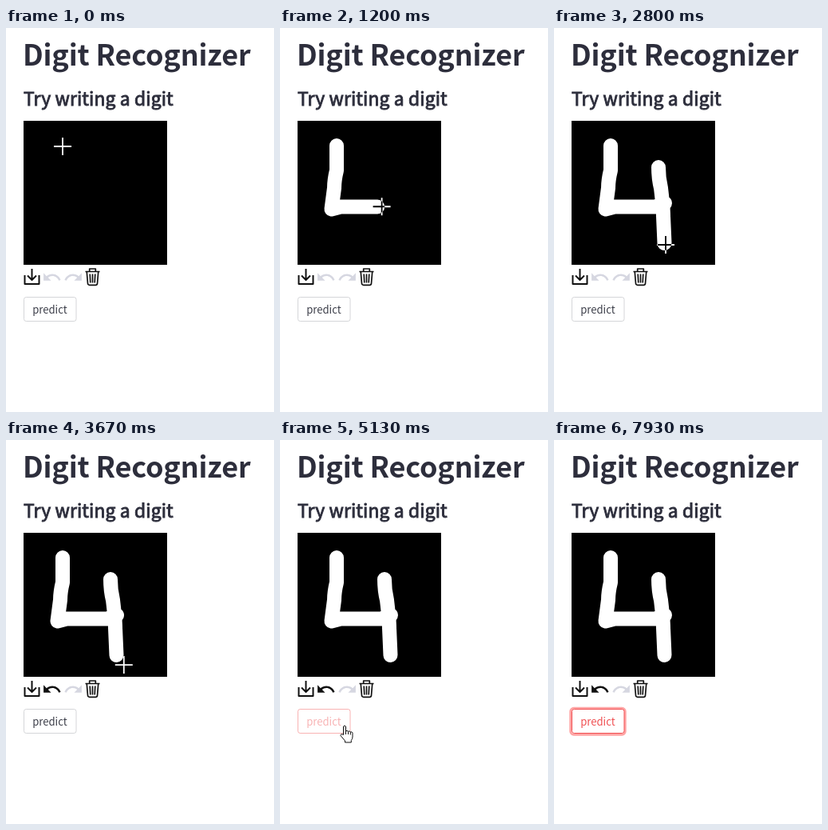
Animation, 336 px wide and 480 px high, one loop 8 s. Source, as an HTML page:

```html
<!DOCTYPE html>
<html lang="en">
<head>
<meta charset="utf-8">
<title>Digit Recognizer</title>
<style>
  html, body { margin: 0; width: 100%; height: 100%; overflow: hidden; background: #fff; }
  svg { display: block; width: 336px; height: 480px; }
  text { font-family: "Noto Sans CJK JP", "Noto Sans CJK SC", "Noto Sans CJK", "Open Sans", sans-serif; fill: #2d2e3c; }
  .title { font-size: 36.05px; font-weight: 700; letter-spacing: -.005em; }
  /* Regular weight thickened to a semibold */
  .sub { font-size: 22.9px; letter-spacing: .1px; stroke: #2d2e3c; stroke-width: .9; }
  .label { font-size: 13.1px; }
  .ink { fill: none; stroke: #fff; stroke-width: 18; stroke-linecap: round; stroke-linejoin: round; }
  .icon { fill: none; stroke: #111; stroke-linejoin: round; }
  .pointer { fill: #fff; stroke: #111; stroke-linejoin: round; }
  #cross { fill: none; stroke: #fff; stroke-width: 1.8; mix-blend-mode: difference; }
</style>
</head>
<body>
<svg viewBox="0 0 336 480">
  <defs>
    <path id="bend" d="M12.5 8c-2.65 0-5.05.99-6.9 2.6L2 7v9h9l-3.62-3.62c1.39-1.16 3.16-1.88 5.12-1.88 3.54 0 6.55 2.31 7.6 5.5l2.37-.78C21.08 11.03 17.15 8 12.5 8z"/>
  </defs>
  <rect width="336" height="480" fill="#fff"/>
  <text class="title" x="21" y="47">Digit Recognizer</text>
  <text class="sub" x="22" y="97">Try writing a digit</text>

  <rect x="22" y="116" width="180" height="180"/>
  <path class="ink" id="ink1" d="M71 147V178Q68 190 68 200L64.5 226.5L76 223.5H127L139 219"/>
  <path class="ink" id="ink2" d="M131 174Q131 188 134 200Q137 225 137 235L138.5 269"/>

  <path class="icon" stroke-width="2" d="M23.5 309V320H41.5V309M32.5 301V314M27 309.5L32.5 315L38 309.5"/>
  <use id="undo" href="#bend" transform="translate(45 299) scale(1.05)"/>
  <use href="#bend" transform="translate(97 299) scale(-1.05 1.05)" fill="#d6d7e1"/>
  <path class="icon" stroke-width="1.7" d="M99.5 304.5H117.5M104.7 304V301H112.3V304M101.3 305L102.5 319.3Q102.7 321.3 104.7 321.3H112.3Q114.3 321.3 114.5 319.3L115.7 305M105.2 307.5L105.8 318.5M108.5 307.5V318.5M111.8 307.5L111.2 318.5"/>

  <rect id="ring" x="20.7" y="335.2" width="68.6" height="33.1" rx="4" fill="none" stroke="#ff4b4b" stroke-opacity=".5" stroke-width="2.8"/>
  <rect id="button" x="22.5" y="336.5" width="65.5" height="30" rx="2.8" fill="#fff"/>
  <text class="label" id="label" x="33.2" y="356.8">predict</text>

  <path id="cross" d="M-11 0H11M0 -11V11"/>
  <path class="pointer" id="arrow" d="M0 0V15.5L3.6 12.2L6 17.5L8.4 16.4L6.1 11.3H11Z"/>
  <path class="pointer" id="hand" d="M-1.5 11.5V1Q0 -1 1.5 1V7Q3 5.5 4.5 7.3Q6 6 7.3 8Q9 7 10 9.2V14Q10 16.5 8.3 18.5V21H.5V19L-5 12.5Q-5 9.5 -1.5 11.5ZM1.5 7V11M4.5 7.3V11M7.3 8V11.5"/>
</svg>
<script>
const LOOP = 8000, INK_LAG = 40, RELEASE = 3100, HOVER = 5020, HOVER_FADE = 450, FOCUS = 5450;
const el = id => document.getElementById(id);
const clamp = v => Math.max(0, Math.min(1, v));
const ease = k => k * k * (3 - 2 * k);
const progress = (step, t) => clamp((t - step.from) / (step.to - step.from));

// The pointer either follows an ink path or glides to a point, then rests
const steps = [
  { from: 150, to: 1290, ink: el("ink1") },
  { from: 1400, to: 1740, x: 131, y: 174 },
  { from: 1800, to: 2700, ink: el("ink2") },
  { from: 2700, to: 2780, x: 140, y: 271 },
  { from: 3500, to: 4200, x: 192, y: 338 },
  { from: 4400, to: 5120, x: 81, y: 357 },
  { from: 5300, to: 5420, x: 76.5, y: 356 },
  { from: 6650, to: 7220, x: 350, y: 308 }
];
const strokes = steps.filter(step => step.ink);

function pointerAt(t) {
  let p = { x: 71, y: 148 };
  for (const step of steps) {
    if (t < step.from) break;
    const k = progress(step, t);
    p = step.ink
      ? step.ink.getPointAtLength(step.ink.getTotalLength() * k)
      : { x: p.x + (step.x - p.x) * ease(k), y: p.y + (step.y - p.y) * ease(k) };
  }
  return p;
}

const inside = (p, l, t, r, b) => p.x >= l && p.x <= r && p.y >= t && p.y <= b;
const show = (node, on) => node.setAttribute("visibility", on ? "visible" : "hidden");

function draw(t) {
  for (const step of strokes) {
    const k = progress(step, t - INK_LAG);
    show(step.ink, k > 0);
    step.ink.setAttribute("stroke-dasharray", `${step.ink.getTotalLength() * k} 999`);
  }
  el("undo").setAttribute("fill", t < RELEASE ? "#d6d7e1" : "#111");

  const hover = t >= HOVER;
  const red = `rgba(240, 80, 82, ${.25 + .75 * clamp((t - HOVER) / HOVER_FADE)})`;
  el("button").setAttribute("stroke", hover ? red : "#d5d6d9");
  el("label").style.fill = hover ? red : "#3c3e49";
  show(el("ring"), t >= FOCUS);

  const p = pointerAt(t);
  const kind = inside(p, 22, 116, 202, 296) ? "cross"
    : inside(p, 22, 336, 88, 367) ? "hand" : "arrow";
  for (const id of ["cross", "hand", "arrow"]) {
    show(el(id), id === kind);
    el(id).setAttribute("transform", `translate(${p.x} ${p.y})`);
  }
}

const begin = performance.now();
function tick() {
  draw((performance.now() - begin) % LOOP);
  requestAnimationFrame(tick);
}
tick();
</script>
</body>
</html>
```
